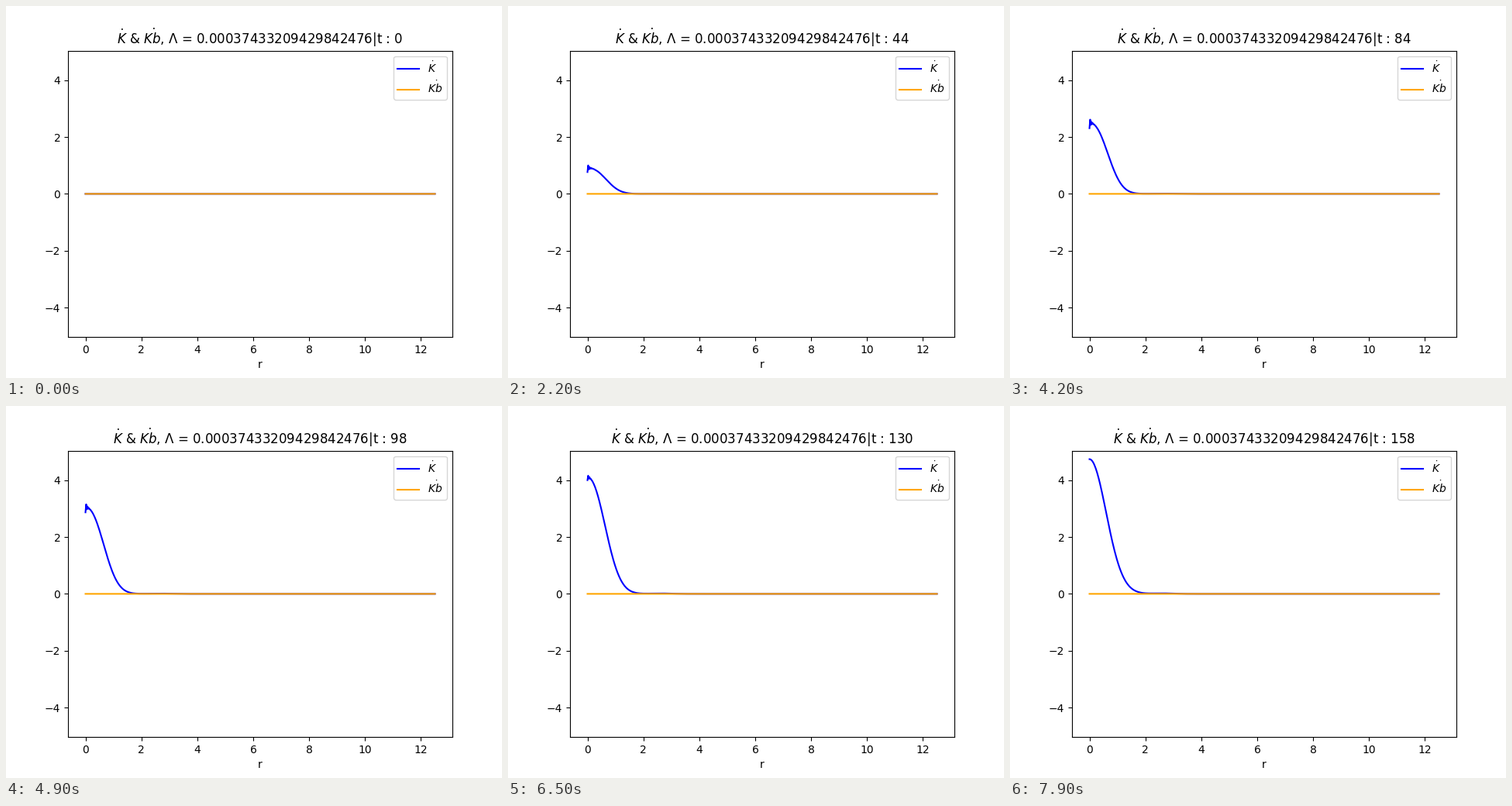
A matplotlib script that plays this animation: 640x480 px, repeating every 8000 ms.

```python
import numpy as np
import matplotlib.pyplot as plt
from matplotlib.animation import FuncAnimation

FRAMES, INTERVAL, STEP = 80, 100, 2
T_END = STEP * (FRAMES - 1)
LAMBDA = "0.00037433209429842476"
K, KB = r"$\dot{K}$", r"$\dot{Kb}$"

r = np.linspace(0, 12.5, 501)
cell = np.arange(r.size)


def k_dot(t):
    s = t / T_END
    phase = t * (.0107 - 2.1e-5 * t + 2.6e-8 * t ** 2)
    amp = 5.2 * np.sin(phase) ** 2
    # The flat-topped pulse relaxes towards a Gaussian
    power = 2.35 - .35 * s ** 3
    pulse = np.exp(-(r / .84) ** power)
    tail = .004 * np.exp(-((r - 2.6) / .6) ** 2)
    # Grid-scale ringing next to r = 0
    ringing = -.19 * np.sin(np.pi * s) * np.exp(-cell / 2) * np.cos(np.pi * cell)
    return amp * (pulse + tail) + ringing


fig, ax = plt.subplots(figsize=(6.4, 4.8), dpi=100)
k_line, = ax.plot(r, 0 * r, color="blue", label=K, snap=False)
ax.plot(r, 0 * r, color="orange", label=KB, snap=False)
ax.set_ylim(-5.04, 5.04)
ax.set_xlabel("r")
ax.legend(loc="upper right")
title = ax.set_title("")


def update(i):
    t = STEP * i
    k_line.set_ydata(k_dot(t))
    title.set_text(rf"{K} & {KB}, $\Lambda$ = {LAMBDA}|t : {t}")
    return k_line, title


anim = FuncAnimation(fig, update, frames=FRAMES, interval=INTERVAL,
                     repeat=True, repeat_delay=0)
plt.show()
```
